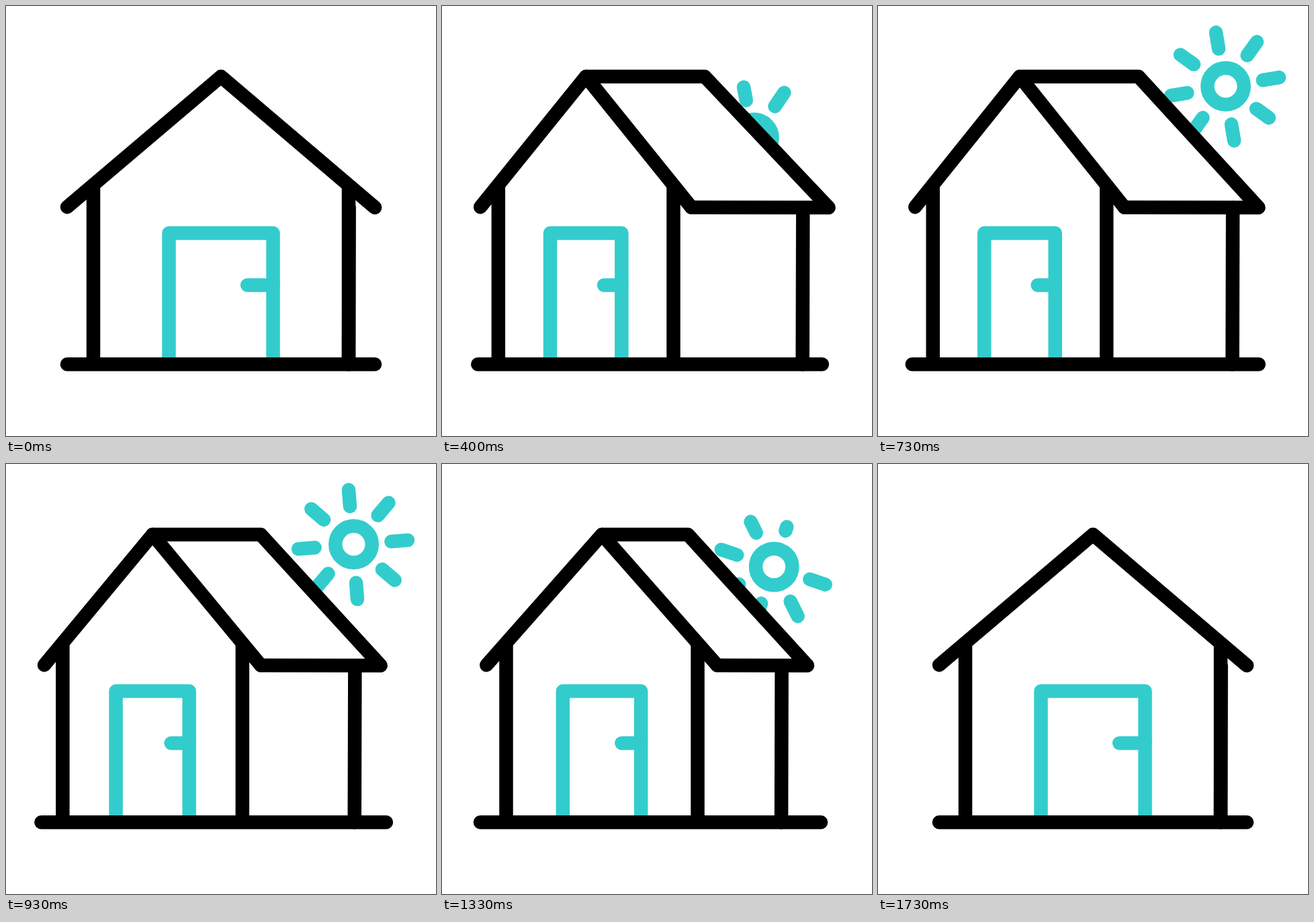
These frames come from a looping animation (640x640 px, 2000 ms). An HTML page with a canvas:

```html
<!DOCTYPE html>
<html lang="en">
<head>
<meta charset="utf-8">
<title>House and sun</title>
<style>
html, body { margin: 0; width: 100%; height: 100%; overflow: hidden; background: #fff; }
canvas { display: block; width: 640px; height: 640px; }
</style>
</head>
<body>
<canvas id="stage" width="640" height="640"></canvas>
<script>
const ctx = document.getElementById('stage').getContext('2d');
const TEAL = '#33cccc', BLACK = '#000', LINE = 20.5;
const TOP = 105, EAVE = 300, GROUND = 533.3;

// Key poses of the turning house; times are in ticks of 1/30 s
const closed = { wallL: 130, wallR: 510, backTop: 320, backEave: 549, baseL: 91, baseR: 549 };
const poses = [
  { at: 0.95, ...closed },
  { at: 13.4, wallL: 78, wallR: 323.5, backTop: 400, backEave: 579, baseL: 48.5, baseR: 568 },
  { at: 34, wallL: 87, wallR: 363.5, backTop: 370.5, backEave: 549, baseL: 54, baseR: 565 },
  { at: 40, wallL: 95.5, wallR: 380.5, backTop: 366, backEave: 544, baseL: 57, baseR: 564 },
  { at: 52, ...closed }
];

const clamp = v => Math.min(1, Math.max(0, v));

function poseAt(t) {
  const i = Math.max(1, poses.findIndex(p => p.at >= t));
  const to = t > 52 ? poses[4] : poses[i], from = t > 52 ? to : poses[i - 1];
  const p = clamp((t - from.at) / (to.at - from.at || 1));
  const pose = {};
  for (const name in closed) pose[name] = from[name] + (to[name] - from[name]) * p;
  return pose;
}

function trace(points) {
  ctx.beginPath();
  points.forEach(([x, y]) => ctx.lineTo(x, y));
}

function line(color, cap, ...points) {
  ctx.strokeStyle = color;
  ctx.lineCap = cap;
  trace(points);
  ctx.stroke();
}

function drawSun(t) {
  const rising = Math.max(0, 16.4 - t), setting = Math.max(0, t - 38.07);
  const drop = 17.4 * (rising + setting);
  const turn = 0.83 * (t - 33.5) - 8.6 * rising + 6.8 * setting;
  const x = 517.5 - drop * 0.695, y = 119.5 + drop;
  ctx.strokeStyle = TEAL;
  ctx.beginPath();
  ctx.arc(x, y, 27.2, 0, 7);
  ctx.stroke();

  // Rays grow, and later shrink, one after another
  const progress = (start, k) => clamp(((t - start) / 1.6 - k) / 2);
  for (let k = 0; k < 8; k++) {
    const length = 24.7 * (progress(7.8, k) - progress(36, (k + 7) % 8));
    if (length <= 0) continue;
    const a = (90 - 45 * k + turn) * Math.PI / 180;
    const at = r => [x - 1 + r * Math.sin(a), y + 0.4 - r * Math.cos(a)];
    line(TEAL, 'round', at(57), at(57 + length));
  }
}

function drawHouse(t) {
  const { wallL, wallR, backTop, backEave, baseL, baseR } = poseAt(t);
  const across = p => wallL + (wallR - wallL) * p;
  const apex = [across(0.5), TOP], back = [backTop, TOP], corner = [backEave, EAVE];
  const eaveL = [across(-0.1026), EAVE - 0.8], eaveR = [across(1.1026), EAVE - 0.3];
  const backWall = backEave - 38.7;

  ctx.fillStyle = '#fff';
  trace([eaveL, apex, back, corner, [backWall, EAVE], [backWall, GROUND], [wallL, GROUND], [wallL, 270]]);
  ctx.fill();

  const doorL = across(0.296), doorR = across(0.704);
  line(TEAL, 'butt', [doorL, GROUND], [doorL, 338], [doorR, 338], [doorR, GROUND]);
  line(TEAL, 'round', [across(0.603), 415.5], [doorR, 415.5]);

  for (const x of [wallL, wallR]) line(BLACK, 'butt', [x, 270], [x, GROUND]);
  line(BLACK, 'round', [backWall + 0.3, EAVE], [backWall - 0.3, GROUND]);
  line(BLACK, 'round', apex, back, corner, eaveR);
  line(BLACK, 'round', eaveL, apex, eaveR);
  line(BLACK, 'round', [baseL, GROUND], [baseR, GROUND]);
}

function draw() {
  const t = Math.floor((performance.now() % 2000 + 3.4) * 0.03);
  ctx.clearRect(0, 0, 640, 640);
  ctx.lineWidth = LINE;
  ctx.lineJoin = 'round';
  if (t > 5 && t < 49) drawSun(t);
  drawHouse(t);
  requestAnimationFrame(draw);
}
draw();
</script>
</body>
</html>
```
